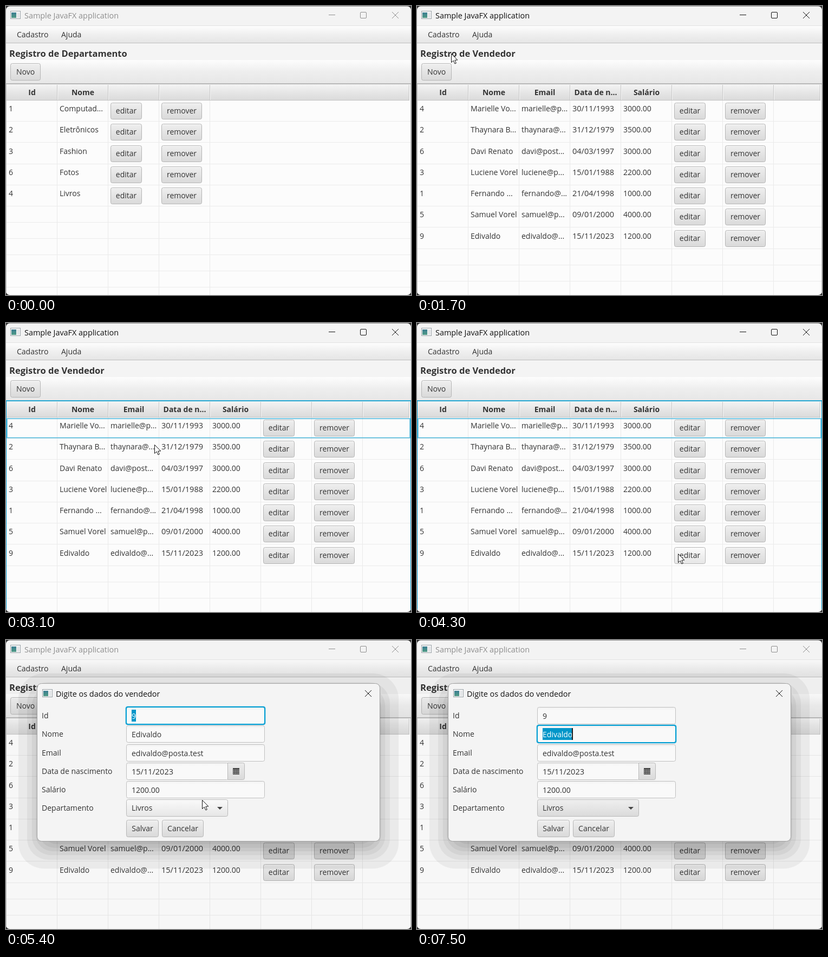
An HTML page with a canvas for the animation above (8 s loop, 748x535 px).

```html
<!DOCTYPE html>
<html lang="pt-BR">
<head>
<meta charset="utf-8">
<title>Cadastro</title>
<style>
html, body { margin: 0; width: 748px; height: 535px; overflow: hidden; }
canvas { display: block; }
</style>
</head>
<body>
<canvas id="stage" width="748" height="535"></canvas>
<script>
const W = 748, H = 535, LOOP = 8000, STEP = 100;
const ctx = document.getElementById('stage').getContext('2d');
const BLUE = '#0096c9', INK = '#333', GREY = '#8e8e8e', EDGE = '#b9b9b9';

const departments = [
  ['1', 'Computad...'], ['2', 'Eletrônicos'], ['3', 'Fashion'], ['6', 'Fotos'], ['4', 'Livros']
];
const sellers = [
  ['4', 'Marielle Vo...', 'marielle@p...', '30/11/1993', '3000.00'],
  ['2', 'Thaynara B...', 'thaynara@...', '31/12/1979', '3500.00'],
  ['6', 'Davi Renato', 'davi@post...', '04/03/1997', '3000.00'],
  ['3', 'Luciene Vorel', 'luciene@p...', '15/01/1988', '2200.00'],
  ['1', 'Fernando ...', 'fernando@...', '21/04/1998', '1000.00'],
  ['5', 'Samuel Vorel', 'samuel@p...', '09/01/2000', '4000.00'],
  ['9', 'Edivaldo', 'edivaldo@...', '15/11/2023', '1200.00']
];

// Pointer position: time, x, y
const pointerPath = [
  [400, 105, 138], [900, 62, 66], [1100, 59, 62], [1200, 64, 75], [1300, 64, 84], [1400, 64, 84],
  [1500, 63, 88], [2200, 63, 88], [2900, 271, 218], [3000, 271, 218], [3900, 373, 436],
  [4000, 395, 432], [4100, 395, 432], [4200, 440, 428], [4300, 482, 427], [4600, 492, 425],
  [5100, 492, 425], [5400, 362, 296], [5500, 362, 296], [5700, 352, 212]
];

function pointerAt(t) {
  if (t < 400 || t >= 5800) return null;
  const i = pointerPath.findIndex(p => p[0] > t);
  if (i < 0) return pointerPath[pointerPath.length - 1].slice(1);
  const [t0, x0, y0] = pointerPath[i - 1], [t1, x1, y1] = pointerPath[i];
  const u = (t - t0) / (t1 - t0), e = u * u * (3 - 2 * u);
  return [Math.round(x0 + (x1 - x0) * e), Math.round(y0 + (y1 - y0) * e)];
}

function box(x, y, w, h, fill) {
  ctx.fillStyle = fill;
  ctx.fillRect(x, y, w, h);
}

function round(x, y, w, h, r, fill, stroke, width = 1) {
  ctx.beginPath();
  ctx.roundRect(x, y, w, h, r);
  if (fill) { ctx.fillStyle = fill; ctx.fill(); }
  if (stroke) { ctx.strokeStyle = stroke; ctx.lineWidth = width; ctx.stroke(); }
}

function fade(y, h, ...colors) {
  const g = ctx.createLinearGradient(0, y, 0, y + h);
  colors.forEach((c, i) => g.addColorStop(i / (colors.length - 1), c));
  return g;
}

function text(s, x, midY, { size = 14, bold = false, color = INK, align = 'left' } = {}) {
  ctx.font = `${bold ? 'bold ' : ''}${size}px "Open Sans", "Noto Sans", sans-serif`;
  ctx.fillStyle = color;
  ctx.textAlign = align;
  ctx.fillText(s, x, midY + 5);
}

function line(color, ...points) {
  ctx.strokeStyle = color;
  ctx.lineWidth = 1;
  ctx.beginPath();
  for (const [x0, y0, x1, y1] of points) { ctx.moveTo(x0, y0); ctx.lineTo(x1, y1); }
  ctx.stroke();
}

function focusRing(x, y, w, h) {
  round(x - 1, y - 1, w + 2, h + 2, 4, null, 'rgba(3,158,211,.25)', 2);
  round(x, y, w, h, 3, null, '#039ed3', 2);
}

function button(label, x, y, w, h, state = '') {
  const tones = { hover: ['#fcfcfc', '#f0f0f0', '#e6e6e6'], press: ['#d4d4d4', '#cacaca', '#c4c4c4'] };
  const fill = fade(y, h, ...(tones[state] || ['#efefef', '#e4e4e4', '#d9d9d9']));
  round(x + .5, y + .5, w - 1, h - 1, 3, fill, '#b5b5b5');
  line('rgba(255,255,255,.7)', [x + 3, y + 1.5, x + w - 3, y + 1.5]);
  text(label, x + w / 2, Math.floor(y + h / 2), { align: 'center' });
}

function appIcon(x, y) {
  box(x, y, 19, 15, '#9aa3a8');
  box(x + 1, y + 1, 17, 13, '#f7f7f7');
  box(x + 2, y + 3, 9, 10, fade(y + 3, 10, '#3d7f93', '#4f9a84'));
  box(x + 12, y + 3, 5, 10, '#e3e6e8');
}

function closeMark(x, y, color) {
  line(color, [x, y, x + 12, y + 12], [x + 12, y, x, y + 12]);
}

function titleBar(active) {
  const color = active ? '#111' : GREY;
  box(0, 0, W, 37, '#f3f3f3');
  box(0, 36, W, 1, '#e2e2e2');
  appIcon(8, 9);
  text('Sample JavaFX application', 34, 18, { size: 14.4, color });
  line(color, [596, 16.5, 608, 16.5]);
  round(654.5, 11.5, 11, 11, 1.5, null, color);
  closeMark(713, 11, color);
}

const rowTop = i => Math.round(175 + 39.25 * i);

function table(heads, rows, focused, editState) {
  const count = heads.length, dataCols = rows[0].length, right = 94 * count;
  box(0, 143, W, H - 143, '#fcfcfc');
  box(0, 143, W, 2, '#b8b8b8');
  box(1, 145, 744, 30, fade(145, 30, '#f4f4f4', '#e6e6e6', '#dadada'));
  box(1, 174, 744, 1, '#c4c4c4');
  for (let x = 94; x <= right; x += 94) {
    box(x, 146, 1, 28, '#c6c6c6');
    box(x + 1, 146, 1, 28, '#f6f6f6');
  }
  box(744, 146, 1, 28, '#c6c6c6');
  heads.forEach((h, i) => text(h, 48 + 94 * i, 160, { bold: true, align: 'center' }));

  for (let x = 94; x <= right; x += 94) box(x, 175, 1, H - 175, '#e9e9e9');
  rows.forEach((row, i) => {
    const top = rowTop(i);
    box(1, top + 38, W - 2, 1, '#ebebeb');
    row.forEach((s, c) => text(s, 94 * c + 5, top + 15, { size: c === 3 ? 14.5 : 14 }));
    const last = i === rows.length - 1;
    button('editar', 94 * dataCols + 5, top + 4, 58, 31, last ? editState : '');
    button('remover', 94 * dataCols + 99, top + 4, 75, 31);
  });
  for (let y = rowTop(rows.length - 1) + 68; y < H; y += 30) box(1, y, W - 2, 1, '#ebebeb');

  const side = focused ? '#039ed3' : '#c6c6c6';
  box(0, 144, 1, H - 144, side);
  box(W - 1, 144, 1, H - 144, side);
  if (focused) {
    box(0, 143, W, 2, '#24a7d2');
    ctx.strokeStyle = '#45b4da';
    ctx.lineWidth = 1.5;
    ctx.strokeRect(2, 177, 744, 35.5);
  }
}

function menuPopup(hovered) {
  ctx.save();
  ctx.shadowColor = 'rgba(0,0,0,.4)';
  ctx.shadowBlur = 12;
  ctx.shadowOffsetY = 5;
  box(10, 69, 118, 74, '#fafafa');
  ctx.restore();
  ctx.strokeStyle = '#bcbcbc';
  ctx.lineWidth = 1;
  ctx.strokeRect(10.5, 69.5, 117, 73);
  if (hovered) box(11, 74, 116, 32, BLUE);
  text('Vendedor', 17, 90, { color: hovered ? '#fff' : INK });
  text('Departamento', 17, 122);
}

function mainWindow(t) {
  const onSellers = t >= 1700, active = t >= 900 && t < 4800;
  titleBar(active);
  box(0, 37, W, 32, fade(37, 32, '#fdfdfd', '#efefef', '#e5e5e5'));
  box(0, 68, W, 1, '#bdbdbd');
  const menuLit = t >= 800 && t < 1700;
  if (menuLit) box(10, 37, 79, 32, BLUE);
  text('Cadastro', 20, 53, { color: menuLit ? '#fff' : INK });
  text('Ajuda', 102, 53);

  box(0, 69, W, 31, '#f4f4f4');
  text('Registro de ' + (onSellers ? 'Vendedor' : 'Departamento'), 6, 89, { size: 16.5, bold: true });
  box(0, 100, W, 43, fade(100, 43, '#fdfdfd', '#eeeeee', '#e7e7e7'));
  button('Novo', 8, 106, 56, 32);
  if (active && !onSellers) focusRing(8, 106, 56, 32);

  if (onSellers) {
    const edit = t >= 4300 && t < 4800 ? (t === 4500 ? 'press' : 'hover') : '';
    table(['Id', 'Nome', 'Email', 'Data de n...', 'Salário', '', ''], sellers, t >= 1800 && t < 4500, edit);
    if (t >= 4500 && t < 4800) focusRing(475, 415, 58, 31);
  } else {
    table(['Id', 'Nome', '', ''], departments, false, '');
  }
  if (t >= 1000 && t < 1700) menuPopup(t >= 1200);
}

function field(label, value, y, { focused = false, selected = false, caret = false, w = 256 } = {}) {
  text(label, 66, y + 16);
  round(222.5, y + .5, w - 1, 31, 3, fade(y, 6, '#f0f0f0', '#f9f9f9'), '#bfbfbf');
  if (focused) focusRing(222, y, w, 32);
  const size = value.includes('/') ? 14.5 : 14;
  text(value, 232, y + 17, { size });
  const width = ctx.measureText(value).width;
  if (selected) {
    box(232, y + 5, width, 22, BLUE);
    text(value, 232, y + 17, { size, color: '#fff' });
  }
  if (caret) box(Math.floor(231 + width), y + 5, 2, 22, '#222');
}

function datePicker(hovered) {
  field('Data de nascimento', '15/11/2023', 227, { w: 189 });
  round(409.5, 227.5, 31, 31, [0, 3, 3, 0], fade(227, 32, hovered ? '#f8f8f8' : '#ececec', hovered ? '#e8e8e8' : '#dadada'), EDGE);
  box(419, 237, 12, 12, '#4a4a4a');
  for (let r = 0; r < 3; r++)
    for (let c = 0; c < 4; c++) box(420 + c * 3, 240 + r * 3, 1.5, 1.5, '#d5d5d5');
}

function comboBox(hovered) {
  const tones = hovered ? ['#fafafa', '#f0f0f0', '#e6e6e6'] : ['#efefef', '#e5e5e5', '#dadada'];
  text('Departamento', 66, 311);
  round(222.5, 295.5, 187, 31, 3, fade(295, 32, ...tones), EDGE);
  text('Livros', 232, 311);
  ctx.fillStyle = '#444';
  ctx.beginPath();
  ctx.moveTo(390, 309);
  ctx.lineTo(400, 309);
  ctx.lineTo(395, 314);
  ctx.fill();
}

// Soft shadow in a few flat bands, spaced by a logistic falloff
function dialogShadow() {
  const bands = 8, spread = 13, drop = 16;
  ctx.save();
  ctx.beginPath();
  ctx.rect(0, 0, W, H);
  ctx.roundRect(58, 81, 632, 291, 8);
  ctx.clip('evenodd');
  for (let i = 0; i < bands; i++) {
    const p = (i + .5) / bands, d = spread * Math.log((1 - p) / p);
    round(58 - d, 81 + drop - d, 632 + 2 * d, 291 + 2 * d, 30 + d / 2, 'rgba(0,0,0,.05)');
  }
  ctx.restore();
}

function dialog(t) {
  const ready = t >= 4900, inset = ready ? 0 : 1;
  box(0, 37, W, H - 37, `rgba(0,0,0,${ready ? .02 : .01})`);
  dialogShadow();
  if (ready) round(58, 81, 632, 291, 8, '#f4f4f4');
  else round(58, 81, 632, 37, [8, 8, 0, 0], '#fafafa');
  round(57.5 + inset, 80.5 + inset, 633 - 2 * inset, 292 - 2 * inset, 8, null, '#a2a2a2');
  appIcon(67, 91);
  closeMark(663, 93, '#111');
  if (!ready) return;

  text('Digite os dados do vendedor', 92, 100, { size: 14.4, color: '#111' });
  const onName = t >= 6100;
  field('Id', '9', 124, { focused: !onName, selected: !onName });
  field('Nome', 'Edivaldo', 158, {
    focused: onName,
    selected: t >= 6400,
    caret: onName && (t < 7000 || t >= 7500)
  });
  field('Email', 'edivaldo@posta.test', 193);
  datePicker(t === 5700);
  field('Salário', '1200.00', 261);
  comboBox(t >= 5400 && t < 5600);
  button('Salvar', 222, 333, 60, 32);
  button('Cancelar', 288, 333, 77, 32);
}

function pointer([x, y]) {
  const shape = [[0, 0], [0, 16], [3.7, 12.6], [6.4, 18.4], [8.8, 17.4], [6.3, 11.7], [11.3, 11.5]];
  ctx.beginPath();
  shape.forEach(([dx, dy]) => ctx.lineTo(x + dx + .5, y + dy + .5));
  ctx.closePath();
  ctx.fillStyle = '#fff';
  ctx.fill();
  ctx.strokeStyle = '#111';
  ctx.lineWidth = 1;
  ctx.stroke();
}

function draw(time) {
  const t = Math.floor((time % LOOP) / STEP) * STEP;
  box(0, 0, W, H, '#303030');
  ctx.save();
  ctx.beginPath();
  ctx.roundRect(0, .5, W, H - .5, 7);
  ctx.clip();
  mainWindow(t);
  if (t >= 4800) dialog(t);
  ctx.restore();
  const p = pointerAt(t);
  if (p) pointer(p);
}

const start = performance.now();
function tick() {
  draw(performance.now() - start);
  requestAnimationFrame(tick);
}
tick();
</script>
</body>
</html>
```
